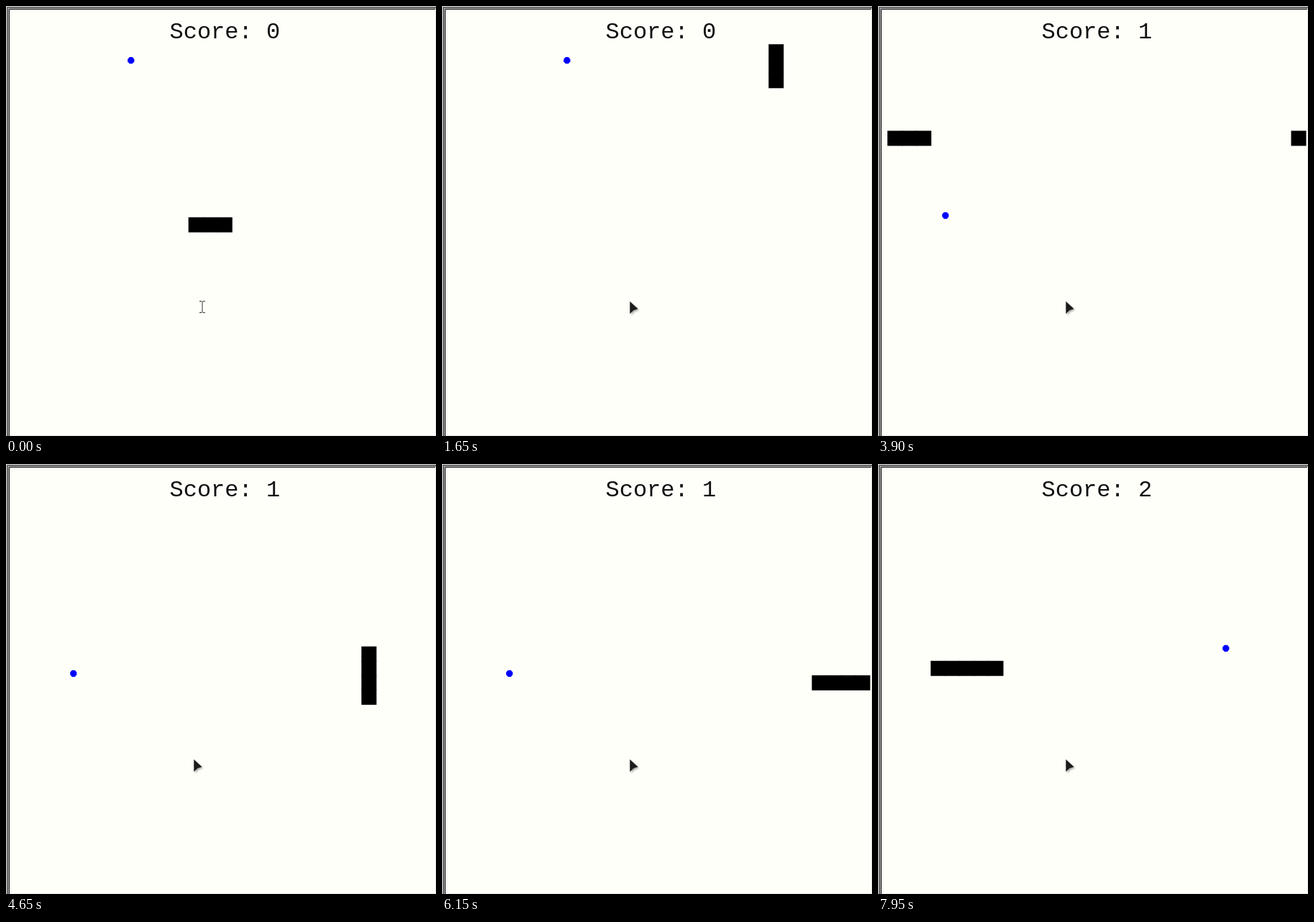
These frames come from a looping animation (598 px wide and 598 px high, 8 s). An HTML page:

```html
<!DOCTYPE html>
<html lang="en">
<head>
<meta charset="utf-8">
<title>Snake</title>
<style>
  html, body { margin: 0; width: 100%; height: 100%; overflow: hidden; background: #fffffa; }
  svg { display: block; width: 100vw; height: 100vh; }
  text { font: 32px "Courier New", "Liberation Mono", monospace; fill: #111; white-space: pre; }
  .line { fill: none; stroke-width: 1; }
</style>
</head>
<body>
<svg viewBox="0 0 598 598">
  <defs>
    <filter id="blur" x="-50%" y="-50%" width="200%" height="200%"><feGaussianBlur stdDeviation="1.4"/></filter>
  </defs>
  <rect width="598" height="598" fill="#fffffa"/>
  <path class="line" stroke="#dedede" d="M.5 598V.5H598"/>
  <path class="line" stroke="#666" style="stroke-width:2" d="M2 598V2H598"/>
  <path class="line" stroke="#aaa" d="M3.5 598V3.5H598"/>
  <path class="line" stroke="#111" d="M4.5 598V4.5H597"/>
  <path class="line" stroke="#e6e6e2" d="M597.5 5V597.5H5"/>

  <text id="score" x="227.5" y="45">Score: 0</text>
  <g id="snake"></g>
  <path id="food" fill="#00f" d="M-2-4.6H2L4.6-1.6V1.6L2 4.6H-2L-4.6 1.6V-1.6Z"/>

  <path id="beam" class="line" stroke="#333" d="M269 410.5H272L273 411.5L274 410.5H277M273 411V426M269 426.5H272L273 425.5L274 426.5H277"/>
  <g id="arrow">
    <path d="M262.5 413L274 423L268 424.5L263 430Z" fill="#000" opacity=".4" filter="url(#blur)"/>
    <path d="M261.3 410.8L272.5 421.3L266.5 423L261.3 428Z" fill="#1c1c1c"/>
  </g>
</svg>
<script>
const LOOP = 8000, TICK = 50, COLS = 29, CELL = 20.05;
const byId = id => document.getElementById(id);

// Route of the head; columns wrap around the field.
const ROUTE = 'R8 U12 L15 D6 L12 D8 R9 U2 L8 U1 L22';
const DIRS = { R: [1, 0], L: [-1, 0], U: [0, -1], D: [0, 1] };
const trail = [[12, 12], [13, 12], [14, 12]];
const START = trail.length - 1;
for (const leg of ROUTE.split(' ')) {
  const [dx, dy] = DIRS[leg[0]];
  for (let n = +leg.slice(1); n > 0; n--) {
    const [x, y] = trail[trail.length - 1];
    trail.push([(x + dx + COLS) % COLS, y + dy]);
  }
}

// [step, ms]: even pace between entries, short stalls where they lie apart.
const PACE = [
  [0, 0], [1, 50], [10, 750], [11, 900], [19, 1500], [20, 1650], [29, 2250],
  [30, 2400], [35, 2750], [36, 2850], [40, 3175], [41, 3250], [48, 3750],
  [49, 3900], [60, 4650], [61, 4750], [70, 5400], [71, 5450], [84, 6450],
  [90, 6950], [94, 7250], [95, 7350], [103, 7950]
];
const stepTimes = [0];
for (let i = 1; i < PACE.length; i++) {
  const [s0, t0] = PACE[i - 1], [s1, t1] = PACE[i];
  for (let s = s0 + 1; s <= s1; s++) {
    const t = t0 + (t1 - t0) * (s - s0) / (s1 - s0);
    stepTimes.push(Math.floor(t / TICK + 1e-6) * TICK);
  }
}

const EATEN = [36, 102];
const FOOD = [[173.8, 75.6], [93.8, 291.3], [483.8, 256.3]];
const ARROW_AT = 300;

const squares = Array.from({ length: 5 }, () => {
  const square = document.createElementNS('http://www.w3.org/2000/svg', 'rect');
  square.setAttribute('width', 21);
  square.setAttribute('height', 21);
  byId('snake').append(square);
  return square;
});

const show = (el, on) => el.setAttribute('visibility', on ? 'visible' : 'hidden');

function draw(t) {
  let step = stepTimes.length - 1;
  while (stepTimes[step] > t) step--;

  const score = EATEN.filter(s => step >= s).length;
  const length = 3 + EATEN.filter(s => step > s).length;
  squares.forEach((square, i) => {
    show(square, i < length);
    if (i >= length) return;
    const [x, y] = trail[START + step - i];
    square.setAttribute('x', 13.1 + CELL * x);
    square.setAttribute('y', 53.2 + CELL * y);
  });

  byId('score').textContent = 'Score: ' + score;
  byId('food').setAttribute('transform', `translate(${FOOD[score]})`);
  show(byId('beam'), t < ARROW_AT);
  show(byId('arrow'), t >= ARROW_AT);
}

const begin = performance.now();
function frame() {
  draw((performance.now() - begin) % LOOP);
  requestAnimationFrame(frame);
}
draw(0);
requestAnimationFrame(frame);
</script>
</body>
</html>
```
